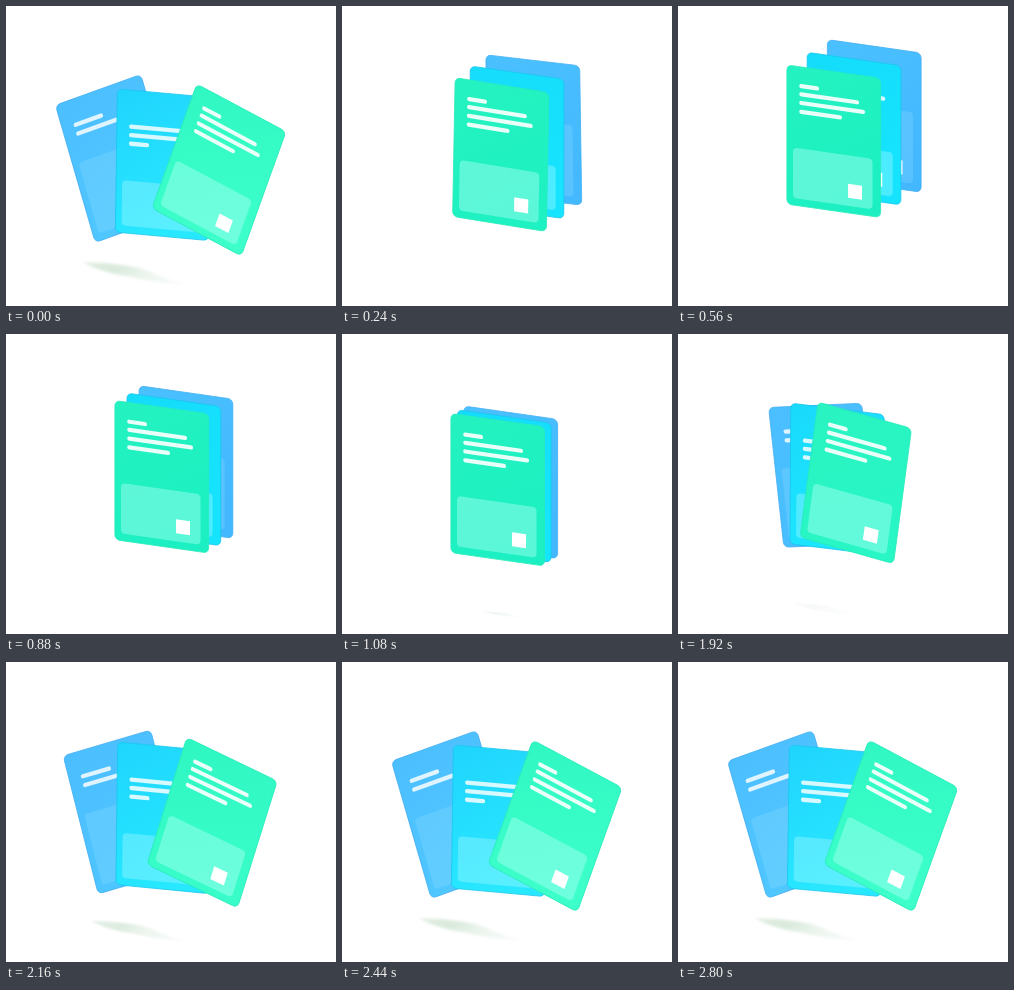
Recreate the animation shown at these times as an HTML page. Size 330 by 300 pixels, loop 2840 ms.

```html
<!DOCTYPE html>
<html lang="en">
<head>
<meta charset="utf-8">
<title>Card stack</title>
<style>
html, body { margin: 0; width: 100%; height: 100%; overflow: hidden; background: #fff; }
svg { display: block; width: 100vw; height: 100vh; }
</style>
</head>
<body>
<svg id="stage" viewBox="0 0 330 300">
  <defs>
    <linearGradient id="shade" x1="0" y1="0" x2="1" y2=".25">
      <stop offset="0" stop-color="#e2eee3"/>
      <stop offset=".35" stop-color="#d8e9db"/>
      <stop offset=".6" stop-color="#e8f3ea"/>
      <stop offset="1" stop-color="#f8fbf8"/>
    </linearGradient>
    <filter id="soft" x="-20%" y="-60%" width="140%" height="220%">
      <feGaussianBlur stdDeviation="1.4"/>
    </filter>
  </defs>
  <path id="shadow" fill="url(#shade)" filter="url(#soft)"
    d="M-53-11C-30-10-2-8 12-2C22 3 38 8 54 12C30 11 10 8-4 4C-25 1-42-4-53-11Z"/>
</svg>
<script>
const LOOP = 2840, W = 94.5, H = 140;
const NS = 'http://www.w3.org/2000/svg';
const stage = document.getElementById('stage');
const shadow = document.getElementById('shadow');
const defs = stage.querySelector('defs');

// fan: corner x, y, top edge vector, left edge vector
// lines: x end, y; depth: share of the stack offset
const cards = [
  { depth: 1, fan: [49, 99, 86, -31, 40, 138],
    lines: [[42.8, 25], [70, 33.8]], panelTop: 61, panelTint: '#a0e4ff', panelAlpha: .22,
    stack: ['#4ac0ff', '#43b8ff'], open: ['#4cbeff', '#50c8ff'], edge: '#44b0f5' },
  { depth: .5, fan: [111, 82.5, 94, 8.5, -2, 144],
    lines: [[76.5, 35.8], [70.5, 44], [31, 52.4]], panelTop: 88.5, panelTint: '#d8ffff', panelAlpha: .28,
    stack: ['#14dcfa', '#16e4ff'], open: ['#20d4fd', '#28e8ff'], edge: '#1ac8ee' },
  { depth: 0, fan: [190.5, 77.5, 90, 48, -45, 125],
    lines: [[30.5, 19.6], [70.5, 27.7], [76.5, 36.4], [53.5, 45.2]], panelTop: 82, panelTint: '#b4fff8', panelAlpha: .42,
    stack: ['#24f2c0', '#1cf0c2'], open: ['#30f8c2', '#3cffca'], edge: '#28ecba' }
];

const lerp = (a, b, k) => a + (b - a) * k;
const ramp = (t, a, b) => {
  const k = Math.min(1, Math.max(0, (t - a) / (b - a)));
  return k * k * (3 - 2 * k);
};

// Blend two vectors by length and angle
function turn(ax, ay, bx, by, k) {
  const len = lerp(Math.hypot(ax, ay), Math.hypot(bx, by), k);
  const ang = lerp(Math.atan2(ay, ax), Math.atan2(by, bx), k);
  return [len * Math.cos(ang), len * Math.sin(ang)];
}

// Monotone cubic through [time, value] keys
function track(keys) {
  const n = keys.length;
  const slope = keys.slice(1).map((k, i) => (k[1] - keys[i][1]) / (k[0] - keys[i][0]));
  const tan = keys.map((_, i) => {
    const a = slope[i - 1], b = slope[i];
    if (i === 0 || i === n - 1) return i ? a : b;
    return a * b > 0 ? 2 * a * b / (a + b) : 0;
  });
  return t => {
    let i = 0;
    while (i < n - 2 && t > keys[i + 1][0]) i++;
    const [t0, v0] = keys[i], [t1, v1] = keys[i + 1], d = t1 - t0;
    const s = (t - t0) / d, r = 1 - s;
    return v0 * (1 + 2 * s) * r * r + tan[i] * d * s * r * r
      + v1 * s * s * (3 - 2 * s) - tan[i + 1] * d * s * s * r;
  };
}

const height = track([[0, 79], [240, 71], [560, 58.5], [620, 57.5], [800, 62], [960, 71], [1080, 79],
  [1120, 74.5], [1200, 69], [1320, 65.8], [1540, 64.4], [1700, 65], [2160, 60], [LOOP, 60]]);
const spread = track([[0, 40.5], [600, 40.5], [1080, 13], [1520, 9.5], [LOOP, 9.5]]);
const shadowAlpha = track([[0, 1], [200, 0], [960, 0], [1080, .35], [1200, 0],
  [1800, 0], [2160, .85], [2360, 1], [LOOP, 1]]);
const openness = t => t < 1000 ? 1 - ramp(t, 0, 280) : ramp(t, 1640, 2305);

function add(parent, tag, attrs) {
  const el = document.createElementNS(NS, tag);
  for (const k in attrs) el.setAttribute(k, attrs[k]);
  return parent.appendChild(el);
}

const rgb = hex => [1, 3, 5].map(i => parseInt(hex.slice(i, i + 2), 16));
const mix = (a, b, k) => {
  const q = rgb(b);
  return `rgb(${rgb(a).map((v, i) => Math.round(lerp(v, q[i], k)))})`;
};

cards.forEach((c, i) => {
  const grad = add(defs, 'linearGradient', { id: 'fill' + i, x1: 0, y1: 0, x2: .4, y2: 1 });
  c.stops = [0, 1].map(offset => add(grad, 'stop', { offset }));
  c.el = add(stage, 'g', {});
  add(c.el, 'rect', { x: .4, y: .4, width: W - .8, height: H - .8, rx: 5,
    fill: `url(#fill${i})`, stroke: c.edge, 'stroke-width': .8 });
  add(c.el, 'rect', { x: 6.5, y: c.panelTop, width: 79.5, height: 132.5 - c.panelTop, rx: 4,
    fill: c.panelTint, 'fill-opacity': c.panelAlpha });
  for (const [end, y] of c.lines)
    add(c.el, 'path', { d: `M14.8 ${y}H${end}`, stroke: '#fff', 'stroke-opacity': i === 2 ? .9 : .82,
      'stroke-width': 4.2, 'stroke-linecap': 'round' });
  add(c.el, 'rect', { x: 61.5, y: 110.5, width: 14, height: 14, fill: '#fff' });
});

function draw(t) {
  const p = openness(t), g = height(t), d = spread(t);
  for (const c of cards) {
    const [fx, fy, fux, fuy, fvx, fvy] = c.fan;
    const sx = 108.5 + d * c.depth, sy = g - (.65 * d - 1) * c.depth, rise = 13.5;
    const [ux, uy] = turn(W, rise, fux, fuy, p);
    const [vx, vy] = turn(0, H, fvx, fvy, p);
    // each card turns about its centre
    const x = lerp(sx + W / 2, fx + (fux + fvx) / 2, p) - (ux + vx) / 2;
    const y = lerp(sy + (rise + H) / 2, fy + (fuy + fvy) / 2, p) - (uy + vy) / 2;
    c.el.setAttribute('transform', `matrix(${[ux / W, uy / W, vx / H, vy / H, x, y]})`);
    c.stops.forEach((s, i) => s.setAttribute('stop-color', mix(c.stack[i], c.open[i], p)));
  }
  const kx = lerp(.42, 1, p), ky = lerp(.3, 1, p);
  shadow.setAttribute('transform', `translate(${lerp(163, 130, p)} ${lerp(280.5, 267, p)}) scale(${kx} ${ky})`);
  shadow.setAttribute('opacity', Math.max(0, shadowAlpha(t)));
}

const start = performance.now();
function tick(now) {
  draw(Math.max(0, now - start) % LOOP);
  requestAnimationFrame(tick);
}
draw(0);
requestAnimationFrame(tick);
</script>
</body>
</html>
```
